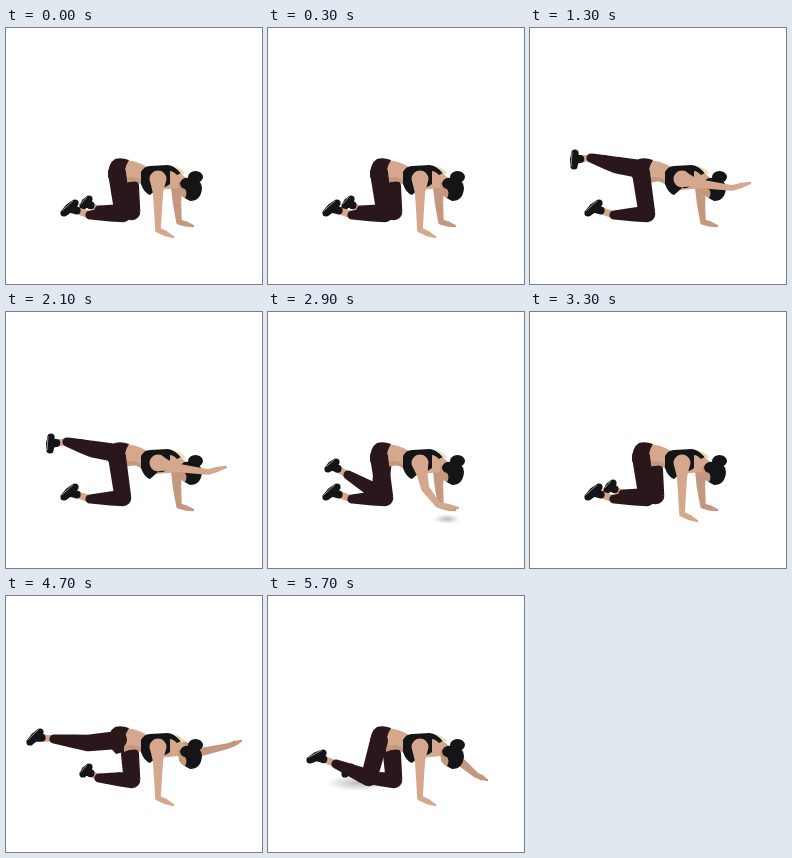
Write an HTML page that moves like this. It is 256x256 px and loops after 5900 ms.

```html
<!DOCTYPE html>
<html lang="en">
<head>
<meta charset="utf-8">
<title>Bird dog exercise</title>
<style>
  html, body { margin: 0; width: 100%; height: 100%; overflow: hidden; background: #fff; }
  svg { display: block; width: 100vw; height: 100vh; }
  .pants { fill: #29171b; }
  .skin { fill: #d5a88e; }
  .shade { fill: #c4977f; }
  .black { fill: #151417; }
  .sole { fill: none; stroke: #a9a9ac; stroke-width: .9; stroke-linecap: round; }
</style>
</head>
<body>
<svg viewBox="0 0 256 256">
  <defs>
    <radialGradient id="soft">
      <stop offset="0" stop-color="#bbb"/>
      <stop offset="1" stop-color="#bbb" stop-opacity="0"/>
    </radialGradient>
  </defs>
  <ellipse id="handShadow" cx="179" cy="207" rx="13" ry="5" fill="url(#soft)"/>
  <ellipse id="footShadow" cx="90" cy="187" rx="32" ry="8" fill="url(#soft)"/>
  <g id="farArm"></g>
  <g id="farLeg"></g>
  <path class="skin" d="M116 132 Q130 132 141 139 L168 139 L180 150 L174 160 L150 162 Q138 158 134 154 Q126 152 117 156Z"/>
  <path class="shade" d="M119 150 Q129 147 136 153 L138 158 Q133 155 131 154 Q126 152 117 156Z"/>
  <path class="black" d="M135 144 Q138 138 144 138 L162 137 Q170 138 175 145 L171 147 Q167 143 164 143 L164 156 Q158 161 152 160 L144 167 Q138 165 135 156Z"/>
  <path d="M166 138 Q174 139 179 145 L176 147 Q172 141 166 138Z" fill="#e6dfb5"/>
  <path class="pants" d="M102 149 Q102 135 109 131 Q115 129 123 132 Q117 141 118 156 L110 158Z"/>
  <g id="nearLeg"></g>
  <path class="shade" d="M172 154 L181 153 L186 172 Q179 173 173 165Z"/>
  <g class="black">
    <ellipse cx="189.500" cy="149" rx="7.500" ry="6"/>
    <path d="M174 155 Q176 149 184 150 Q195 150 196 160 Q195 173 184 173 L179 170 Q182 165 179 161 Q174 160 174 155Z"/>
  </g>
  <g id="nearArm"></g>
</svg>
<script>
const LOOP = 5900;
const el = id => document.getElementById(id);

// Arms: elbow, wrist, fingertips. Legs: hip, knee, ankle, heel, toe.
const rest = {
  nearArm: [152, 178, 152, 202, 167, 209],
  farArm: [171, 175, 173, 194, 187, 198],
  nearLeg: [111, 145, 117, 186, 84, 187, 69, 175, 58, 185],
  farLeg: [124, 158, 126, 184, 93, 182, 83, 171, 77, 178],
  shadows: [0, 0]
};
const pose = parts => ({ ...rest, ...parts });
const lift = pose({
  nearArm: [157, 176, 170, 193, 190, 196],
  farLeg: [115, 147, 112, 182, 80, 163, 68, 150, 60, 157],
  shadows: [1, 0]
});
const reach = pose({
  nearArm: [171, 169, 187, 180, 205, 179],
  farLeg: [111, 144, 102, 163, 69, 149, 57, 138, 51, 147]
});
const hold = pose({
  nearArm: [172, 156, 202, 160, 220, 155],
  farLeg: [110, 141, 86, 137, 61, 130, 45, 125, 44, 138]
});
const reach2 = pose({
  farArm: [194, 167, 208, 179, 219, 184],
  nearLeg: [111, 145, 101, 182, 68, 168, 55, 157, 42, 164],
  shadows: [0, 1]
});
const hold2 = pose({
  farArm: [195, 156, 222, 150, 235, 145],
  nearLeg: [112, 144, 82, 147, 48, 143, 34, 136, 24, 146]
});

// Start time, two poses and the mix between them.
const steps = [
  [0, rest, rest, 0],
  [500, rest, lift, .95],
  [700, reach, hold, 0],
  [900, reach, hold, .8],
  [1100, hold, hold, 0],
  [2500, reach, hold, .93],
  [2700, reach, hold, .1],
  [2900, lift, lift, 0],
  [3100, rest, lift, .08],
  [3300, rest, rest, 0],
  [4300, rest, reach2, .1],
  [4500, reach2, hold2, .45],
  [4700, hold2, hold2, 0],
  [5500, reach2, hold2, .8],
  [5700, reach2, reach2, 0]
];

const blend = (a, b, k) => a.map((v, i) => v + (b[i] - v) * k);
const pairs = list => list.flatMap((v, i) => i % 2 ? [] : [[v, list[i + 1]]]);
const path = (cls, d) => `<path class="${cls}" d="${d}"/>`;

// Rounded tapering tube through the points, one radius for each.
function tube(points, radii) {
  return points.map(([x, y], i) => {
    const r = radii[i];
    let d = `M${x - r} ${y}a${r} ${r} 0 1 0 ${2 * r} 0a${r} ${r} 0 1 0 ${-2 * r} 0Z`;
    if (i + 1 < points.length) {
      const [u, v] = points[i + 1], s = radii[i + 1];
      const len = Math.hypot(u - x, v - y) || 1;
      const nx = (y - v) / len, ny = (u - x) / len;
      d += `M${x + nx * r} ${y + ny * r}L${u + nx * s} ${v + ny * s}` +
           `L${u - nx * s} ${v - ny * s}L${x - nx * r} ${y - ny * r}Z`;
    }
    return d;
  }).join('');
}

function arm(shoulder, size, joints, cls) {
  const [elbow, wrist, tip] = pairs(joints);
  const upper = blend(shoulder, elbow, .5);
  const palm = blend(wrist, tip, .5);
  return path(cls, tube([shoulder, upper, elbow, wrist], [size, 5.2, 4.2, 2.8]) +
                   tube([wrist, palm, tip], [2.8, 2.7, 1.2]));
}

function leg(joints) {
  const [hip, knee, ankle, heel, toe] = pairs(joints);
  const calf = blend(knee, ankle, .4);
  const foot = blend(heel, toe, .5);
  const collar = blend(foot, ankle, .35);
  const len = Math.hypot(toe[0] - heel[0], toe[1] - heel[1]);
  const nx = (heel[1] - toe[1]) / len * 3, ny = (toe[0] - heel[0]) / len * 3;
  const sole = `M${heel[0] + nx} ${heel[1] + ny}L${toe[0] + nx} ${toe[1] + ny}`;
  return path('skin', tube([ankle, collar], [3.6, 3.4])) +
         path('pants', tube([hip, knee, calf, ankle], [9, 8.3, 7, 4.6])) +
         path('black', tube([heel, foot, toe], [3.6, 4.6, 3.6]) + tube([foot, collar], [4.6, 4])) +
         path('sole', sole);
}

function draw(time) {
  const [, a, b, k] = steps.findLast(s => s[0] <= time);
  const now = {};
  for (const part in rest) now[part] = blend(a[part], b[part], k);
  el('farArm').innerHTML = arm([170, 149], 6.5, now.farArm, 'shade');
  el('nearArm').innerHTML = arm([152, 151], 8.5, now.nearArm, 'skin');
  el('farLeg').innerHTML = leg(now.farLeg);
  el('nearLeg').innerHTML = leg(now.nearLeg);
  el('handShadow').setAttribute('opacity', now.shadows[0]);
  el('footShadow').setAttribute('opacity', now.shadows[1]);
}

const start = performance.now();
function tick() {
  draw((performance.now() - start) % LOOP);
  requestAnimationFrame(tick);
}
tick();
</script>
</body>
</html>
```
